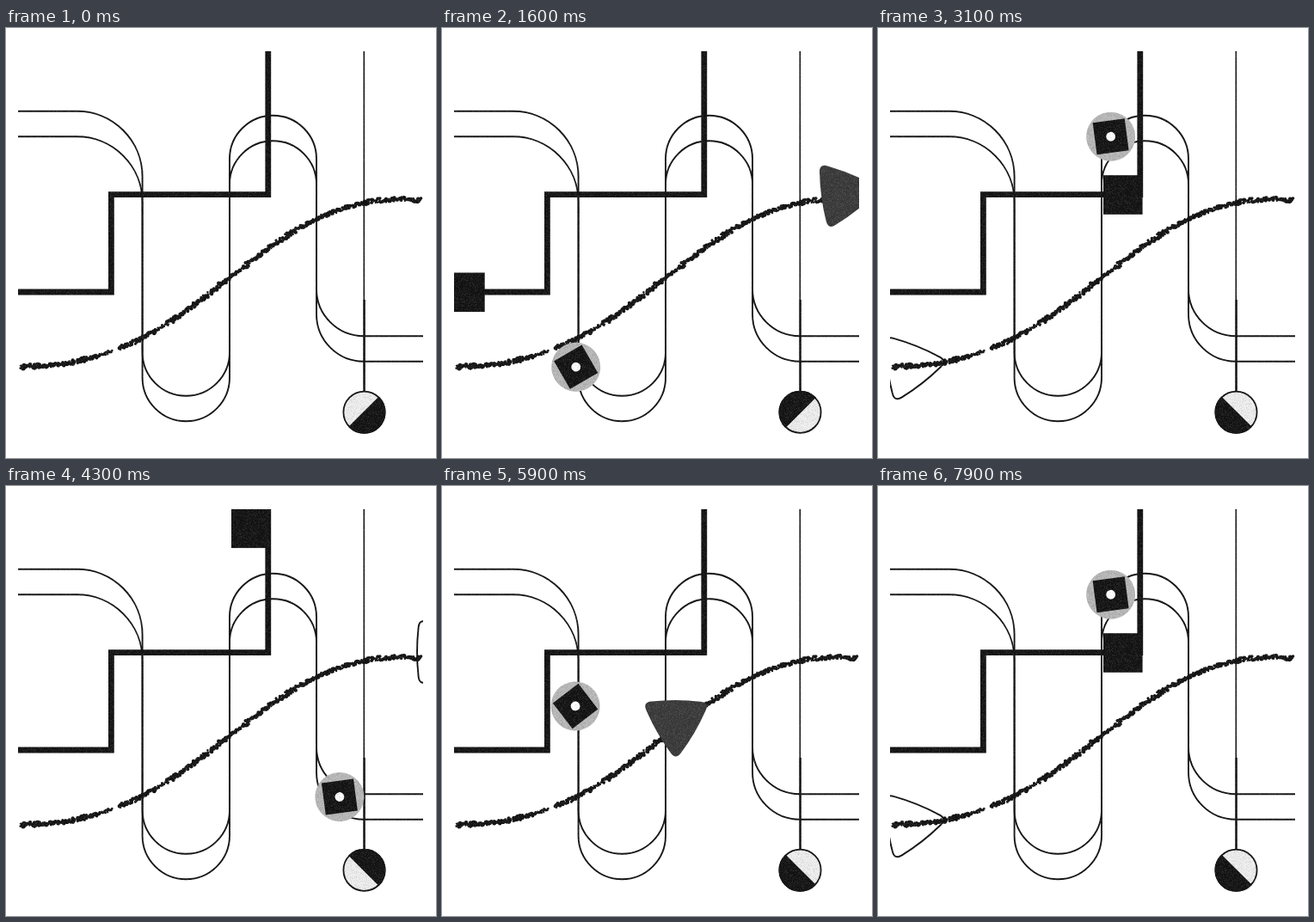
Recreate the animation shown at these times as an HTML page with a canvas. Size 500 px wide and 500 px high, loop 8000 ms.

```html
<!DOCTYPE html>
<html lang="en">
<head>
<meta charset="utf-8">
<title>Moving shapes</title>
<style>
  html, body { margin: 0; width: 100%; height: 100%; overflow: hidden; background: #fff; }
  canvas { display: block; width: 500px; height: 500px; }
</style>
</head>
<body>
<canvas id="stage" width="500" height="500"></canvas>
<script>
const ctx = document.getElementById('stage').getContext('2d');
const LOOP = 8000, CYCLE = 4800, STEP = 100;
const INK = '#131313', TAU = Math.PI * 2, THIN = 1.9;

function seeded(seed) {
  return () => (seed = (seed * 16807) % 2147483647) / 2147483647;
}

function svgPath(d) {
  const p = document.createElementNS('http://www.w3.org/2000/svg', 'path');
  p.setAttribute('d', d);
  return p;
}

// The winding track is drawn twice, 30 px apart; the wheel rolls along its middle.
const winding = (x0, y) =>
  `M${x0} ${y}H82.6A76 76 0 0 1 158.6 ${y + 76}V${y + 280.3}` +
  `A50.7 50.7 0 0 0 260 ${y + 280.3}V${y + 55.5}` +
  `A50.5 50.5 0 0 1 361 ${y + 55.5}V${y + 206.5}` +
  `A55 55 0 0 0 416 ${y + 261.5}H540`;
const rails = [new Path2D(winding(0, 96.7)), new Path2D(winding(0, 126.3))];
const wheelTrack = svgPath(winding(-28, 111.5));
const stairs = new Path2D('M0 307H122.4V193.7H304.8V0');
const pickTrack = svgPath('M-100 394H16C215 394 285 193 460 193H600');

// Ragged brush stroke built from small dabs
const brush = (() => {
  const line = svgPath('M18 394C230 394 283 200 460 199L482 200');
  const rnd = seeded(77), out = new Path2D(), len = line.getTotalLength();
  for (let s = 0; s < len; s += 0.6) {
    const { x, y } = line.getPointAtLength(s);
    const thin = (x > 108 && x < 133) || (x > 176 && x < 188);
    if ((x > 124 && x < 132) || (x > 180 && x < 183 && rnd() < 0.6)) continue;
    const spread = thin ? 3.6 : 4.4 + 0.8 * Math.sin(s / 9);
    const r = 0.8 + rnd() * (thin ? 0.9 : 1.6);
    const px = x + (rnd() - 0.5) * 4, py = y + (rnd() - 0.5) * spread;
    out.moveTo(px + r, py);
    out.arc(px, py, r, 0, TAU);
  }
  return out;
})();

// Rounded triangle whose leading corner points right
const pick = (() => {
  const p = new Path2D();
  const at = (r, a) => [r * Math.cos(a), r * Math.sin(a)];
  p.moveTo(...at(37, -0.16));
  for (let k = 0; k < 3; k++) {
    const a = k * TAU / 3;
    p.quadraticCurveTo(...at(44.7, a), ...at(37, a + 0.16));
    p.quadraticCurveTo(...at(26.6, a + TAU / 6), ...at(37, a + TAU / 3 - 0.16));
  }
  p.closePath();
  return p;
})();

const grain = (() => {
  const c = document.createElement('canvas');
  c.width = c.height = 160;
  const g = c.getContext('2d'), img = g.createImageData(160, 160), rnd = seeded(5);
  for (let i = 0; i < img.data.length; i += 4) {
    const v = rnd() - 0.5;
    img.data.fill(v > 0 ? 255 : 0, i, i + 3);
    img.data[i + 3] = Math.abs(v) * 50;
  }
  g.putImageData(img, 0, 0);
  return ctx.createPattern(c, 'repeat');
})();

const pickKeys = [[0, -60], [400, -35], [700, 36], [1000, 197], [1100, 272],
  [1300, 390], [1600, 466], [1900, 503], [2200, 522], [2400, 530]];
const blockKeys = [[1200, -20, 307.3], [2150, 102.6, 307.3], [2200, 102.6, 307.3],
  [2630, 102.6, 194], [2670, 102.6, 194], [3100, 284.8, 194], [3200, 284.8, 194],
  [4200, 284.8, 49.3], [4350, 284.8, 49.3], [4800, 284.8, -10]];

const segment = (keys, t) => {
  let i = 0;
  while (i < keys.length - 2 && t >= keys[i + 1][0]) i++;
  return i;
};

// Smooth curve through the keys
function spline(keys, t) {
  const i = segment(keys, t), [t0, a] = keys[i], [t1, b] = keys[i + 1];
  const slope = j => {
    const p = keys[Math.max(0, j - 1)], q = keys[Math.min(keys.length - 1, j + 1)];
    return (q[1] - p[1]) / (q[0] - p[0]);
  };
  const h = t1 - t0, u = (t - t0) / h, v = 1 - u;
  return a * v * v * (1 + 2 * u) + b * u * u * (3 - 2 * u)
    + h * u * v * (slope(i) * v - slope(i + 1) * u);
}

// Eased moves from key to key
function easedPoint(keys, t) {
  const i = segment(keys, t), [t0, x0, y0] = keys[i], [t1, x1, y1] = keys[i + 1];
  const u = Math.min(1, Math.max(0, (t - t0) / (t1 - t0))), e = u * u * (3 - 2 * u);
  return [x0 + (x1 - x0) * e, y0 + (y1 - y0) * e];
}

// Point of the pick's track at a given x
function trackPoint(x) {
  let lo = 0, hi = pickTrack.getTotalLength();
  for (let i = 0; i < 18; i++) {
    const mid = (lo + hi) / 2;
    if (pickTrack.getPointAtLength(mid).x < x) lo = mid; else hi = mid;
  }
  return pickTrack.getPointAtLength(lo);
}

function placed(x, y, angle, paint) {
  ctx.save();
  ctx.translate(x, y);
  ctx.rotate(angle);
  paint();
  ctx.restore();
}

function disc(r, color, from = 0, to = TAU) {
  ctx.fillStyle = color;
  ctx.beginPath();
  ctx.arc(0, 0, r, from, to);
  ctx.closePath();
  ctx.fill();
}

function stroke(path, width) {
  ctx.strokeStyle = INK;
  ctx.lineWidth = width;
  ctx.stroke(path);
}

function drawPick(t) {
  const x = spline(pickKeys, t % 2400), { y } = trackPoint(x);
  const tilt = -Math.PI / 6 * Math.max(0, 1 - ((x - 250) / 250) ** 2);
  placed(x, y, tilt, () => {
    if (t < 2400) {
      ctx.fillStyle = '#3a3a3a';
      ctx.fill(pick);
    } else stroke(pick, THIN);
  });
}

function drawBlock(t) {
  const [x, y] = easedPoint(blockKeys, t);
  ctx.fillStyle = INK;
  ctx.fillRect(x - 22.8, y - 22.8, 45.6, 45.6);
}

function drawWheel(t) {
  const { x, y } = wheelTrack.getPointAtLength(0.2765 * t);
  placed(x - 3.5, y - 5.7, t / CYCLE * 5 * TAU, () => {
    disc(28.5, '#b8b8b8');
    ctx.fillStyle = INK;
    ctx.fillRect(-18.7, -18.7, 37.4, 37.4);
    disc(5.4, '#fff');
  });
}

function drawBall(t) {
  placed(416.5, 446.7, Math.PI / 4 + Math.floor(t / 600) * Math.PI / 2, () => {
    ctx.strokeStyle = INK;
    ctx.lineWidth = 1.8;
    disc(24.1, '#eee');
    ctx.stroke();
    disc(24.1, INK, -Math.PI / 2, Math.PI / 2);
    ctx.stroke();
  });
}

function draw(now) {
  const t = Math.floor((now % LOOP) / STEP) * STEP % CYCLE;
  ctx.clearRect(0, 0, 500, 500);
  ctx.save();
  ctx.beginPath();
  ctx.rect(14, 27, 471, 445);
  ctx.clip();

  rails.forEach(rail => stroke(rail, THIN));
  stroke(stairs, 6.8);
  ctx.fillStyle = INK;
  ctx.fillRect(415.5, 27, 1.6, 396);
  ctx.fillRect(415.5, 316, 2.3, 107);
  ctx.fill(brush);
  drawPick(t);
  drawBlock(t);
  drawWheel(t);
  drawBall(t);

  // Paper grain on the inked areas, shifted at each step
  ctx.globalCompositeOperation = 'source-atop';
  const shift = t / STEP;
  ctx.translate(-(shift * 53 % 160), -(shift * 91 % 160));
  ctx.fillStyle = grain;
  ctx.fillRect(0, 0, 660, 660);
  ctx.restore();
}

const start = performance.now();
function tick() {
  draw(performance.now() - start);
  requestAnimationFrame(tick);
}
tick();
</script>
</body>
</html>
```
